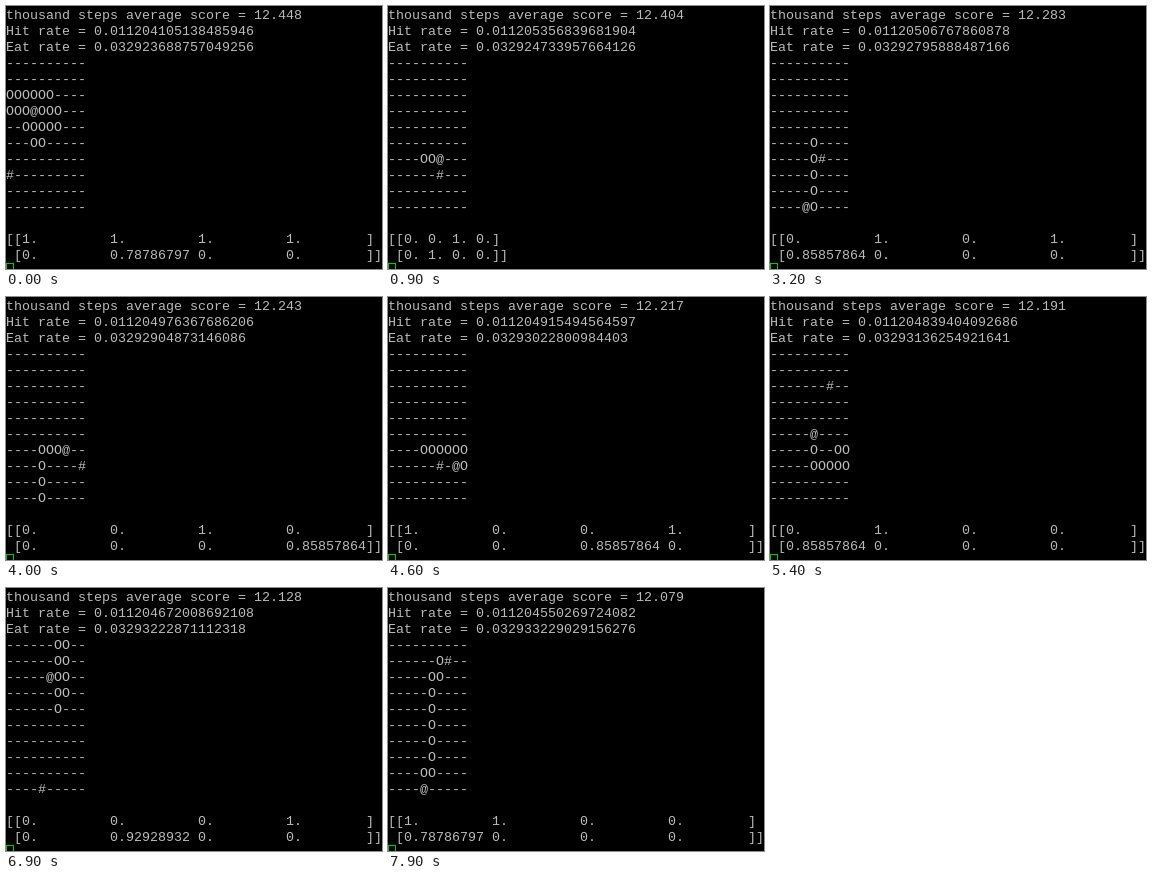
An HTML page with a canvas that plays this animation: 376x263 px, repeating every 8 s.

```html
<!DOCTYPE html>
<html lang="en">
<head>
<meta charset="utf-8">
<title>Snake training log</title>
<style>
  html, body { margin: 0; width: 100%; height: 100%; overflow: hidden; background: #000; }
  canvas { display: block; }
</style>
</head>
<body>
<canvas id="screen" width="376" height="263"></canvas>
<script>
const LOOP = 8000, SIZE = 10, ROW_HEIGHT = 16;
const DIRS = { U: [0, -1], D: [0, 1], L: [-1, 0], R: [1, 0] };

// Starting position: a long snake boxed in by its own body, given as [row, first, last].
const trappedBody = [[2, 0, 5], [3, 0, 2], [3, 4, 6], [4, 2, 6], [5, 3, 4]]
  .flatMap(([y, from, to]) => Array.from({ length: to - from + 1 }, (_, i) => [from + i, y]));

// Moves after the crash, one group for each stretch of play.
const moves = ['LL', 'DRRRD', 'UUUUUUU', 'LDDDDDDDDD', 'LUUURR', 'RRRD', 'LLL',
  'LUUURURU', 'UULDDL', 'DDDDDDLD'].join('');
const foods = [[3, 5], [6, 7], [6, 0], [5, 9], [6, 6], [9, 7], [6, 7], [7, 2], [4, 9], [7, 1]];

// Scores leaving the thousand-step window: [score, steps].
const leavingScores = [[8, 7], [9, 8], [10, 1], [11, 10], [12, 6], [13, 9], [14, 7], [15, 10], [16, 2]]
  .flatMap(([score, steps]) => Array(steps).fill(score));

// Progress through the game, in steps: [time, step].
const pace = [[0, 0.6], [400, 4.6], [500, 4.9], [1900, 15.6], [3200, 26.6], [3400, 28.6],
  [3500, 28.95], [4000, 32.6], [5100, 40.4], [5200, 40.6], [5400, 41.6], [6900, 52.6],
  [7900, 60.6], [LOOP, 60.9]];

const same = (a, b) => a[0] === b[0] && a[1] === b[1];

function matrixLines(head, body, food) {
  const blocked = Object.values(DIRS).map(([dx, dy]) => {
    const cell = [head[0] + dx, head[1] + dy];
    const outside = cell.some(v => v < 0 || v >= SIZE);
    return outside || body.some(part => same(part, cell)) ? 1 : 0;
  });
  const dx = food[0] - head[0], dy = food[1] - head[1];
  const scent = [0, 0, 0, 0];
  const horizontal = Math.abs(dx) >= Math.abs(dy);
  const index = horizontal ? (dx < 0 ? 2 : 3) : (dy < 0 ? 0 : 1);
  scent[index] = 1 - Math.abs(dx) / Math.hypot(SIZE, SIZE);

  const width = dx ? 10 : 2;
  const format = v => (Number.isInteger(v) ? v + '.' : v.toFixed(8)).padEnd(width);
  const row = values => '[' + values.map(format).join(' ') + ']';
  return ['[' + row(blocked), ' ' + row(scent) + ']'];
}

function screenLines({ head, body, food, steps, hits, eats, total }) {
  const grid = Array.from({ length: SIZE }, () => Array(SIZE).fill('-'));
  const put = ([x, y], mark) => { grid[y][x] = mark; };
  put(food, '#');
  body.forEach(part => put(part, 'O'));
  put(head, '@');
  return [
    'thousand steps average score = ' + total / 1000,
    'Hit rate = ' + hits / steps,
    'Eat rate = ' + eats / steps,
    ...grid.map(cells => cells.join('')),
    '',
    ...matrixLines(head, body, food)
  ];
}

function playGame() {
  const game = { head: [3, 3], body: trappedBody, food: [0, 7],
    steps: 736248, hits: 8249, eats: 24240, total: 12448 };
  const screens = [screenLines(game)];
  let meal = 0;
  leavingScores.forEach((leaving, i) => {
    game.steps++;
    if (i === 0) {
      game.hits++;
      Object.assign(game, { head: [5, 5], body: [[6, 5]], food: foods[meal] });
    } else {
      const [dx, dy] = DIRS[moves[i - 1]];
      game.body = [game.head, ...game.body];
      game.head = [game.head[0] + dx, game.head[1] + dy];
      if (same(game.head, game.food)) {
        game.eats++;
        game.food = foods[++meal];
      } else {
        game.body.pop();
      }
    }
    game.total += game.body.length - leaving;
    screens.push(screenLines(game));
  });
  return screens;
}

function stepAt(time) {
  const next = pace.findIndex(([t]) => t > time);
  const [t0, s0] = pace[next - 1], [t1, s1] = pace[next];
  return s0 + (s1 - s0) * (time - t0) / (t1 - t0);
}

const screens = playGame();
const ctx = document.getElementById('screen').getContext('2d');

function draw(time) {
  const step = stepAt(time);
  ctx.fillStyle = '#000';
  ctx.fillRect(0, 0, 376, 263);
  ctx.font = '13.333px "Liberation Mono", monospace';
  ctx.fillStyle = '#bbb';
  // The terminal repaints from top to bottom, so lower rows lag a little.
  for (let row = 0; row < screens[0].length; row++) {
    const shown = Math.max(0, Math.floor(step - row * 0.0175));
    ctx.fillText(screens[shown][row], 0, 13 + row * ROW_HEIGHT);
  }
  ctx.strokeStyle = '#0c0';
  ctx.strokeRect(0.5, 257.5, 7, 15);
}

const start = performance.now();
function tick() {
  draw((performance.now() - start) % LOOP);
  requestAnimationFrame(tick);
}
tick();
</script>
</body>
</html>
```
